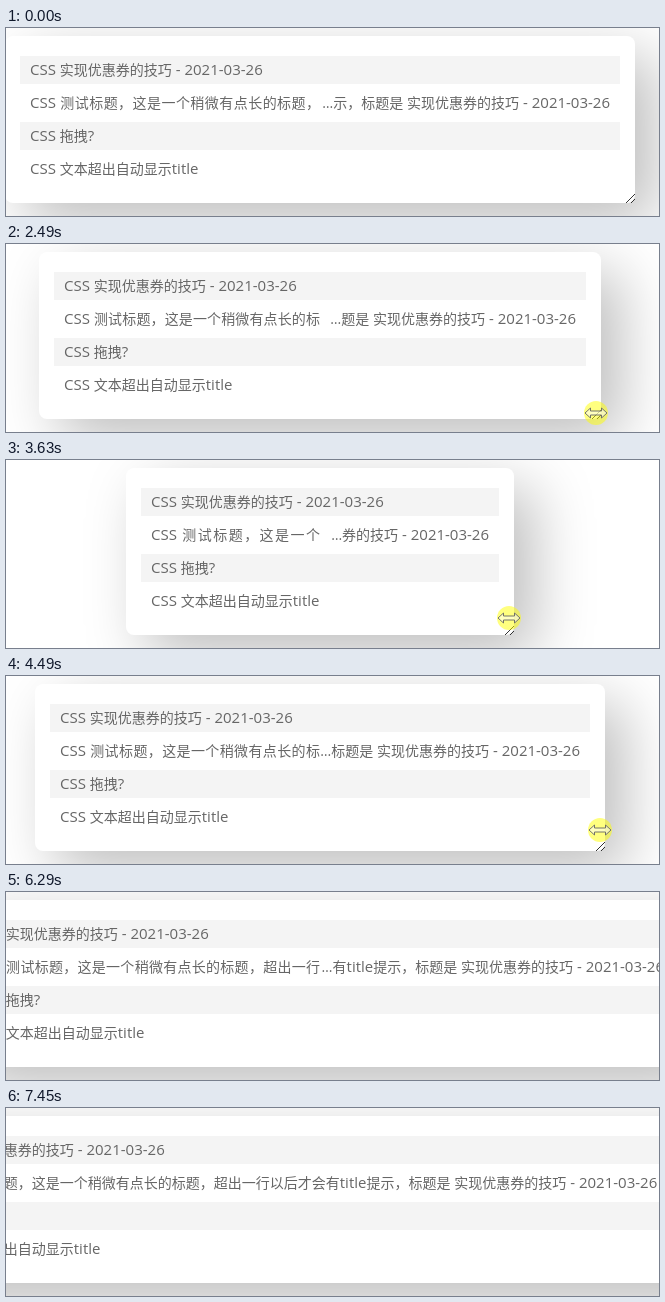
Animation of 653 by 188 pixels, one loop 8 s. Source, as an HTML page:

```html
<!DOCTYPE html>
<html lang="zh-CN">
<head>
<meta charset="utf-8">
<title>CSS 文本超出自动显示title</title>
<style>
  html, body { margin: 0; width: 100%; height: 100%; overflow: hidden; background: #fff; }
  #stage { position: relative; width: 653px; height: 188px; overflow: hidden; }
  #card {
    position: absolute; top: 8px; height: 167px; box-sizing: border-box;
    padding: 20px 15px; border-radius: 8px; background: #fff;
    box-shadow: 20px 20px 60px #bebebe, -20px -20px 60px #fff;
  }
  .row {
    height: 28px; margin-bottom: 5px; padding: 0 10px; overflow: hidden;
    font: 14px/28px "Open Sans", "Noto Sans CJK SC", sans-serif;
    color: #666; text-align: justify; text-spacing-trim: space-all;
  }
  .row:nth-child(odd) { background: #f4f4f4; }
  .latin { font-size: 15px; line-height: 1; }
  .tail {
    float: right; width: 50%; direction: rtl; text-align: right;
    white-space: nowrap; overflow: hidden; text-overflow: ellipsis;
  }
  svg { position: absolute; overflow: visible; }
  #grip { right: 0; bottom: 0; }
  #pointers { left: 0; top: 0; }
</style>
</head>
<body>
<div id="stage">
  <div id="card">
    <div id="rows"></div>
    <svg id="grip" width="10" height="10" fill="none" stroke="#333">
      <path d="M1 10 L10 1 M6 10 L10 6"/>
    </svg>
  </div>
  <svg id="pointers" width="653" height="188">
    <path id="arrow" d="M.5 .5 V16.5 L4.3 12.9 L6.8 18.6 L9.2 17.5 L6.8 12 H12 Z" fill="#fff" stroke="#000"/>
    <g id="resizer">
      <circle id="press" r="12" fill="#ff0" fill-opacity=".5"/>
      <path d="M-11 0 L-5.5 -5 V-2 H5.5 V-5 L11 0 L5.5 5 V2 H-5.5 V5 Z" fill="#fff" fill-opacity=".5" stroke="#666" stroke-width=".9"/>
    </g>
  </svg>
</div>
<script>
const LOOP = 8000;
const CENTER_SUM = 628; // left + right of the centred card
const LONG_TITLE = 1;
const ARROW_SHOWN = 130, RESIZER_SHOWN = 1150, PRESSED = 2110;
const titles = [
  'CSS 实现优惠券的技巧 - 2021-03-26',
  'CSS 测试标题，这是一个稍微有点长的标题，超出一行以后才会有title提示，标题是 实现优惠券的技巧 - 2021-03-26',
  'CSS 拖拽?',
  'CSS 文本超出自动显示title'
];

const $ = id => document.getElementById(id);
const markLatin = text => text.replace(/[ -~]+/g, '<span class="latin">$&</span>');

$('rows').innerHTML = titles.map((title, i) => {
  const text = markLatin(title);
  const tail = i === LONG_TITLE ? `<div class="tail">${text}</div>` : '';
  return `<div class="row">${tail}${text}</div>`;
}).join('');

const tail = document.querySelector('.tail');
const fullWidth = tail.scrollWidth;

const easeOut = u => 1 - (1 - u) ** 2;

// Each move is [begin, end, destination]; the value rests between moves.
function follow(value, t, ...moves) {
  for (const [begin, end, destination] of moves) {
    const u = Math.min(1, Math.max(0, (t - begin) / (end - begin)));
    value += (destination - value) * easeOut(u);
  }
  return value;
}

const rightEdge = t => follow(629, t,
  [2270, 3740, 507],
  [4010, 4850, 620], [4900, 5270, 641], [5400, 5810, 656],
  [5980, 6760, 699], [6900, 7450, 727]);
const resizerY = t => follow(169, t, [2490, 4700, 154]);
const arrowX = t => follow(585, t, [80, 280, 572], [450, 1150, 623]);
const arrowY = t => follow(175, t, [80, 280, 150], [450, 1150, 158]);

function place(node, visible, x, y) {
  node.style.display = visible ? '' : 'none';
  node.setAttribute('transform', `translate(${Math.round(x)} ${Math.round(y)})`);
}

function render(t) {
  const right = Math.round(rightEdge(t));
  const left = CENTER_SUM - right;
  $('card').style.left = left + 'px';
  $('card').style.width = right - left + 'px';
  tail.style.display = fullWidth > right - left - 50 ? '' : 'none';

  place($('arrow'), t >= ARROW_SHOWN && t < RESIZER_SHOWN, arrowX(t), arrowY(t));
  place($('resizer'), t >= RESIZER_SHOWN, right - 5, resizerY(t));
  $('press').style.display = t >= PRESSED ? '' : 'none';
}

const start = performance.now();
function tick() {
  render((performance.now() - start) % LOOP);
  requestAnimationFrame(tick);
}
tick();
</script>
</body>
</html>
```
